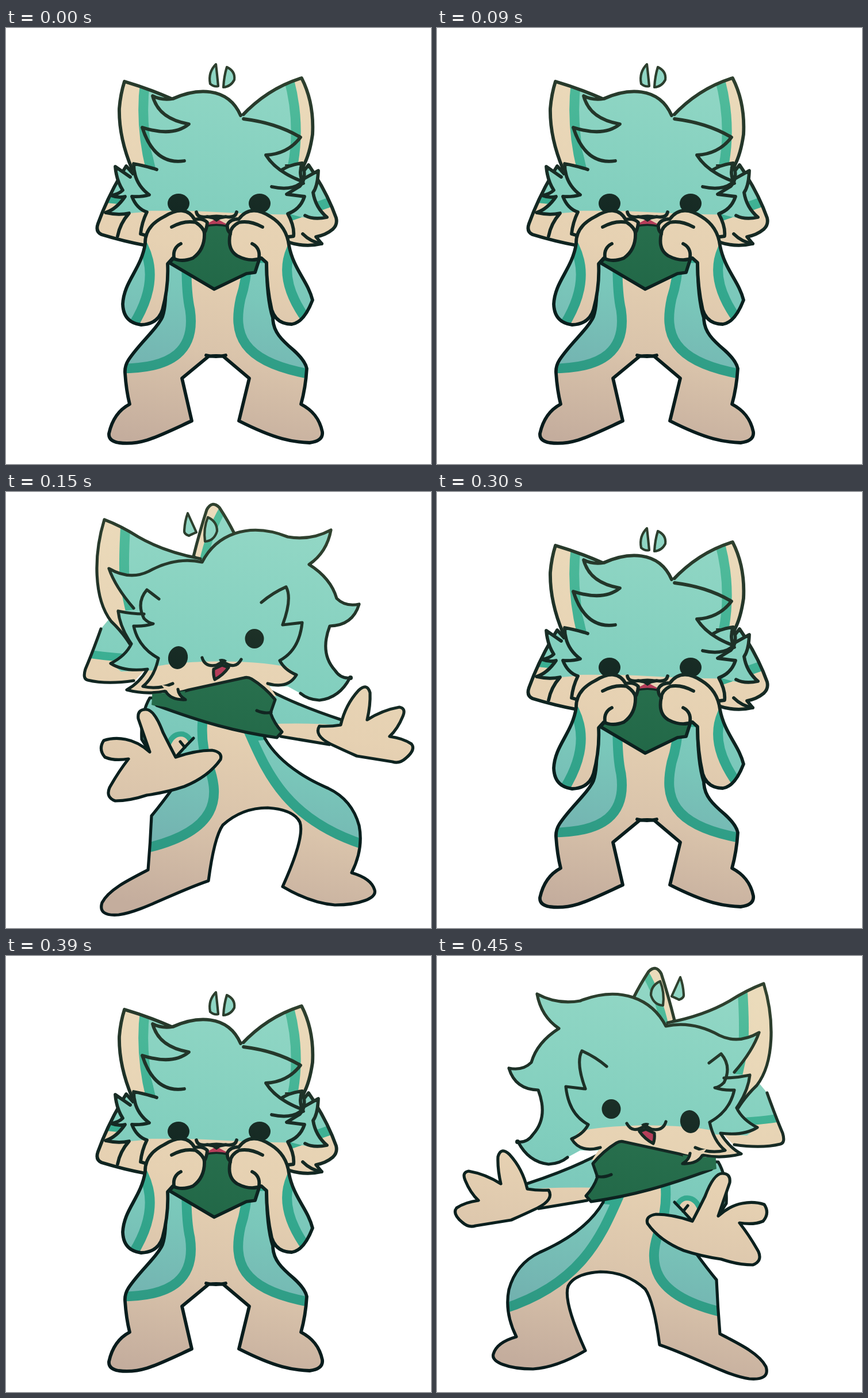
Write an HTML page that moves like this. It is 739x758 px and loops after 0.6 s.

```html
<!DOCTYPE html>
<html lang="en">
<head>
<meta charset="utf-8">
<title>Dancing critter</title>
<style>
html, body { margin: 0; width: 100%; height: 100%; overflow: hidden; background: #fff; }
svg { display: block; width: 100%; height: 100%; }
.pose {
  --skin: url(#skin); --teal: url(#teal); --band: url(#band);
  --green: url(#green); --ink: url(#ink);
}
.flip {
  --skin: url(#skinFlip); --teal: url(#tealFlip); --band: url(#bandFlip);
  --green: url(#greenFlip); --ink: url(#inkFlip); --gaze: translate(4px, 11px);
}
.skin { fill: var(--skin); }
.teal { fill: var(--teal); }
.green { fill: var(--green); }
.dark { fill: var(--ink); }
.pink { fill: #b53d59; }
.patch { fill: var(--teal); stroke: var(--band); stroke-width: 17; }
.cuff { fill: none; stroke: var(--band); stroke-width: 9; }
.line { stroke: var(--ink); stroke-linecap: round; stroke-linejoin: round; }
.open { fill: none; }
.eye { transform: var(--gaze, none); }
.shy .line { stroke-width: 5.8; }
.wave .line { stroke-width: 5.2; }
.shy .fine, .wave .fine { stroke-width: 4.2; }
.pose { visibility: hidden; animation: .6s step-end infinite; }
#showShy { animation-name: shy; }
#showRight { animation-name: right; }
#showLeft { animation-name: left; }
@keyframes shy { 0%, 50% { visibility: visible } 25%, 75%, 100% { visibility: hidden } }
@keyframes right { 0%, 50%, 100% { visibility: hidden } 25% { visibility: visible } }
@keyframes left { 0%, 100% { visibility: hidden } 75% { visibility: visible } }
</style>
</head>
<body>
<svg viewBox="0 0 739 758" preserveAspectRatio="none">
<defs>
  <linearGradient id="skin" gradientUnits="userSpaceOnUse" x1="430" y1="50" x2="310" y2="730">
    <stop offset="0" stop-color="#ebdbbb"/><stop offset=".5" stop-color="#e6d1b2"/>
    <stop offset=".75" stop-color="#dac4ab"/><stop offset="1" stop-color="#c4ad9d"/>
  </linearGradient>
  <linearGradient id="teal" gradientUnits="userSpaceOnUse" x1="430" y1="50" x2="310" y2="730">
    <stop offset="0" stop-color="#92d7c5"/><stop offset=".4" stop-color="#82cfbe"/>
    <stop offset=".6" stop-color="#7ac7ba"/><stop offset=".8" stop-color="#74b6b2"/>
    <stop offset="1" stop-color="#6ca5a6"/>
  </linearGradient>
  <linearGradient id="band" gradientUnits="userSpaceOnUse" x1="430" y1="50" x2="310" y2="730">
    <stop offset="0" stop-color="#54bd9c"/><stop offset=".5" stop-color="#35ab90"/>
    <stop offset="1" stop-color="#2b927e"/>
  </linearGradient>
  <linearGradient id="green" gradientUnits="userSpaceOnUse" x1="430" y1="50" x2="310" y2="730">
    <stop offset=".3" stop-color="#2b7350"/><stop offset=".65" stop-color="#206646"/>
  </linearGradient>
  <linearGradient id="ink" gradientUnits="userSpaceOnUse" x1="430" y1="50" x2="310" y2="730">
    <stop offset="0" stop-color="#30422f"/><stop offset=".35" stop-color="#182c25"/>
    <stop offset=".6" stop-color="#0a201e"/><stop offset="1" stop-color="#081b1c"/>
  </linearGradient>
  <linearGradient id="skinFlip" href="#skin" gradientTransform="matrix(-1 0 0 1 739 0)"/>
  <linearGradient id="tealFlip" href="#teal" gradientTransform="matrix(-1 0 0 1 739 0)"/>
  <linearGradient id="bandFlip" href="#band" gradientTransform="matrix(-1 0 0 1 739 0)"/>
  <linearGradient id="greenFlip" href="#green" gradientTransform="matrix(-1 0 0 1 739 0)"/>
  <linearGradient id="inkFlip" href="#ink" gradientTransform="matrix(-1 0 0 1 739 0)"/>

  <!-- shy pose outlines -->
  <path id="sBody" d="M279 400C277 440 280 480 272 502C262 524 232 548 213 577Q206 588 207 600Q209 630 215 654C196 664 184 682 179 705Q178 718 196 721C235 726 260 712 323 683L306 609L352 571Q366 569 378 571L423 609L405 683C470 716 500 720 528 721Q552 718 550 702C545 678 532 664 513 654Q521 625 523 592Q520 578 500 560C480 543 464 528 464 504C456 480 453 440 453 400Z"/>
  <path id="sLobeL" d="M209 240Q178 290 160 340Q155 354 166 359Q205 371 243 378L262 300Z"/>
  <path id="sLobeR" d="M526 238Q558 285 574 330Q577 342 568 350Q556 360 539 363L549 375Q520 382 490 372L478 300Z"/>
  <path id="sEarL" d="M206 93Q250 106 290 124L300 250L219 245Q196 190 197 140Q199 115 206 93Z"/>
  <path id="sEarR" d="M514 87Q536 130 533 185Q528 220 517 240L430 240L410 153Q455 105 514 87Z"/>
  <path id="sHead" d="M255 118Q270 126 290 123C330 105 385 100 408 152Q470 165 490 180L485 240L515 235Q524 262 514 272L492 290L519 293Q512 315 490 323Q502 345 500 362L484 372L250 372L234 358Q236 338 245 320Q227 314 219 293Q236 294 249 290Q222 270 222 236Q240 239 262 246L250 205Z"/>
  <path id="sArmL" d="M242 375Q241 345 275 328Q312 305 328 333Q342 330 350 338Q349 350 345 356Q346 385 325 400Q305 408 290 400L281 410Q283 450 272 490Q264 515 235 516Q204 512 203 480C205 440 235 420 242 375Z"/>
  <path id="sArmR" d="M492 378Q488 345 460 328Q425 305 405 332Q390 332 385 342Q384 352 390 357Q384 385 402 396Q425 408 444 400L453 408Q453 450 462 490Q470 515 497 515Q518 512 533 473C525 440 500 420 492 378Z"/>
  <clipPath id="csBody"><use href="#sBody"/></clipPath>
  <clipPath id="csLobeL"><use href="#sLobeL"/></clipPath>
  <clipPath id="csLobeR"><use href="#sLobeR"/></clipPath>
  <clipPath id="csEarL"><use href="#sEarL"/></clipPath>
  <clipPath id="csEarR"><use href="#sEarR"/></clipPath>
  <clipPath id="csHead"><use href="#sHead"/></clipPath>
  <clipPath id="csArmL"><use href="#sArmL"/></clipPath>
  <clipPath id="csArmR"><use href="#sArmR"/></clipPath>

  <!-- waving pose outlines -->
  <path id="wBody" d="M250 358Q234 385 236 430L290 515Q268 545 253 563Q251 610 247 657C210 676 178 692 167 714C162 730 172 737 196 735C235 730 290 697 352 676Q362 600 377 579Q410 549 455 549Q500 552 511 574Q520 600 481 686C515 706 545 716 572 718C615 718 645 706 641 692C636 674 615 666 601 662Q622 620 614 580Q602 535 560 515Q480 480 450 428L440 350Z"/>
  <path id="wArm" d="M455 343Q510 372 583 396L583 441Q520 432 465 424Z"/>
  <path id="wEarL" d="M171 48Q200 59 230 78Q275 104 338 116L300 240L215 264Q202 243 183 225C152 185 152 110 171 48Z"/>
  <path id="wEarR" d="M326 112Q337 68 349 31Q358 14 371 27Q386 50 397 72L342 122Z"/>
  <path id="wLobe" d="M165 238Q150 280 138 308Q133 325 142 327Q175 335 222 330L250 300L218 262L180 220Z"/>
  <clipPath id="cwBody"><use href="#wBody"/></clipPath>
  <clipPath id="cwArm"><use href="#wArm"/></clipPath>
  <clipPath id="cwEarL"><use href="#wEarL"/></clipPath>
  <clipPath id="cwEarR"><use href="#wEarR"/></clipPath>
  <clipPath id="cwLobe"><use href="#wLobe"/></clipPath>

  <g id="shy" class="shy">
    <use href="#sBody" class="skin"/>
    <g clip-path="url(#csBody)">
      <path class="patch" d="M314 400Q313 460 320 490C330 560 290 592 200 592L150 592L150 400Z"/>
      <path class="patch" d="M420 400Q418 440 408 470C395 530 405 580 530 602L570 602L570 400Z"/>
    </g>
    <use href="#sBody" class="line open"/>
    <path class="line open" d="M348 569Q365 573 382 569"/>

    <use href="#sLobeL" class="skin"/>
    <g clip-path="url(#csLobeL)"><path class="patch" d="M140 292L240 302L240 220L140 220Z"/></g>
    <use href="#sLobeL" class="line open"/>
    <use href="#sLobeR" class="skin"/>
    <g clip-path="url(#csLobeR)"><path class="patch" d="M500 325L600 290L600 220L500 220Z"/></g>
    <use href="#sLobeR" class="line open"/>

    <use href="#sEarL" class="skin"/>
    <g clip-path="url(#csEarL)"><path class="patch" d="M243 85Q230 170 256 262L340 262L340 85Z"/></g>
    <use href="#sEarL" class="line open"/>
    <use href="#sEarR" class="skin"/>
    <g clip-path="url(#csEarR)"><path class="patch" d="M488 75Q517 170 494 260L390 260L390 75Z"/></g>
    <use href="#sEarR" class="line open"/>

    <path class="teal" d="M216 259L190 241Q192 265 203 282Q196 289 183 291Q195 296 207 293Q192 315 173 321Q195 326 216 322L262 318L250 240Z"/>
    <path class="teal" d="M518 262L543 248Q542 275 534 286Q538 312 558 329Q535 334 515 329L480 320L490 240Z"/>
    <path class="line open" d="M216 259L190 241Q192 265 203 282Q196 289 183 291Q195 296 207 293Q192 315 173 321Q195 326 214 322Q198 340 194 362M518 262L543 248Q542 275 534 286Q538 312 558 329Q535 334 520 326M549 375Q530 372 516 358"/>

    <use href="#sHead" class="teal"/>
    <g clip-path="url(#csHead)"><path class="skin" d="M200 319Q300 316 366 320T540 325V400H200Z"/></g>
    <path class="line open" d="M408 152C385 100 330 105 290 123Q270 126 255 118Q265 158 318 167Q290 190 237 173Q258 239 310 231M413 158Q470 165 512 190Q490 219 452 221Q470 250 516 267Q498 284 462 276"/>
    <path class="line open" d="M262 246Q240 239 222 236Q222 270 249 290Q236 294 219 293Q227 314 245 320Q236 338 234 358L248 362M479 247Q495 237 515 235Q508 253 517 270M515 235Q524 262 511 275L488 289L519 293Q512 315 490 323Q502 345 500 362L484 364"/>
    <ellipse class="dark" cx="300" cy="305" rx="19" ry="17"/>
    <ellipse class="dark" cx="441" cy="305" rx="19" ry="17"/>

    <path class="green line" d="M345 344Q366 338 387 344L440 403L433 425L418 427L362 454L284 408Z"/>
    <path class="pink" d="M345 343L366 331L387 343Q366 338 345 343Z"/>
    <path class="line open" d="M331 320Q333 331 350 328L366 331L382 328Q399 331 401 320"/>
    <path class="dark" d="M350 326Q366 323 382 326L366 337Z"/>

    <use href="#sArmL" class="skin"/>
    <g clip-path="url(#csArmL)"><path class="patch" d="M239 380Q268 440 222 515L170 530L170 380Z"/></g>
    <use href="#sArmL" class="line open"/>
    <path class="line open" d="M288 346Q310 334 330 338Q345 348 345 358M292 399Q290 382 304 375"/>
    <use href="#sArmR" class="skin"/>
    <g clip-path="url(#csArmR)"><path class="patch" d="M496 385Q472 440 526 512L570 520L570 385Z"/></g>
    <use href="#sArmR" class="line open"/>
    <path class="line open" d="M446 346Q424 334 405 338Q390 346 390 358M440 399Q442 382 428 375"/>

    <path class="teal line fine" d="M365 63Q351 77 355 97Q362 103 369 101Q367 80 365 63ZM384 68Q399 75 397 90Q391 102 378 103Q379 84 384 68Z"/>
  </g>

  <g id="wave" class="wave">
    <use href="#wEarR" class="skin"/>
    <g clip-path="url(#cwEarR)"><path class="patch" style="stroke-width:13" d="M378 28Q352 72 341 130L430 130L430 28Z"/></g>
    <use href="#wEarR" class="line open"/>

    <use href="#wArm" class="skin"/>
    <g clip-path="url(#cwArm)"><path class="teal" d="M440 404Q520 400 590 406V330H440Z"/></g>
    <path class="line open" d="M460 346Q510 372 583 396M478 425Q520 432 562 439"/>

    <use href="#wBody" class="skin"/>
    <g clip-path="url(#cwBody)">
      <path class="patch" d="M342 340L342 395Q338 440 352 475C372 530 372 590 240 620L200 620L200 340Z"/>
      <path class="patch" d="M426 425C455 490 490 570 622 613L660 613L660 400Z"/>
    </g>
    <use href="#wBody" class="line open"/>
    <path class="skin" d="M280 445Q288 418 308 421Q318 424 322 434L297 460Z"/>
    <path class="cuff" d="M280 445Q288 418 308 421Q318 424 322 434"/>

    <use href="#wLobe" class="skin"/>
    <g clip-path="url(#cwLobe)"><path class="patch" style="stroke-width:14" d="M130 279Q170 287 240 290V200H130Z"/></g>
    <path class="line open" d="M165 238Q150 280 138 308Q133 325 142 327Q175 335 222 328"/>

    <use href="#wEarL" class="skin"/>
    <g clip-path="url(#cwEarL)"><path class="patch" d="M209 40Q204 110 206 150Q212 200 232 260L360 260L360 40Z"/></g>
    <path class="line open" d="M338 116Q275 104 230 78Q200 59 171 48C152 110 152 185 183 225Q202 243 215 264"/>

    <path class="green" d="M255 350L300 350L300 385L253 370Z"/>
    <path class="skin" d="M245 308Q232 332 210 344Q245 353 282 346L290 310Z"/>
    <path class="teal" d="M341 122Q360 85 398 72Q440 58 490 78Q530 85 565 66Q558 105 527 126Q565 150 575 185Q590 200 614 195Q603 232 563 233Q545 280 572 310Q582 325 598 323Q580 358 545 362Q525 361 512 350L490 338L300 338L265 310L200 312L182 298Q208 285 218 264Q198 235 195 207L222 205Q190 165 179 133Q215 154 248 138Q295 112 341 122Z"/>
    <path class="skin" d="M262 303C310 293 420 290 489 304L505 318Q490 340 455 333L470 355L290 352L238 338Q255 332 262 303Z"/>
    <path class="line open" d="M222 202Q190 165 179 133Q215 154 248 138Q295 112 341 122Q360 85 398 72Q440 58 490 78Q530 85 565 66Q558 105 527 126Q565 150 575 185Q590 200 614 195Q603 232 563 233Q545 280 572 310Q582 325 598 323Q580 358 545 362Q525 361 512 350"/>
    <path class="line open" d="M240 212Q218 212 195 207Q198 235 218 264Q208 285 182 298Q205 313 246 308Q232 332 210 344Q245 353 278 346M266 186L245 170Q226 192 240 220Q248 228 256 229Q240 234 222 233Q230 270 265 289Q258 322 238 338Q265 344 290 333"/>
    <path class="line open" d="M444 192Q464 175 487 165Q498 185 481 231Q498 229 515 227Q510 275 476 293Q484 309 505 318Q490 343 455 333"/>
    <circle class="dark" cx="599" cy="323" r="4"/>
    <ellipse class="dark" cx="299" cy="288" rx="17" ry="20" transform="rotate(12 299 288)"/>
    <ellipse class="dark eye" cx="432" cy="255" rx="16.5" ry="17"/>
    <path class="pink line" d="M361 308Q360 318 363 326Q378 318 387 305L376 301Z"/>
    <path class="line open" d="M341 288Q346 305 366 301L377 295Q399 310 409 291"/>
    <path class="dark" d="M370 291Q378 288 384 293L376 302Z"/>

    <path class="green line" d="M275 352Q300 350 318 344L414 323Q420 321 427 325Q450 339 468 361L460 384Q466 402 480 417L471 427C400 417 340 400 262 371Z"/>
    <path class="green" d="M254 351L312 346L300 378L255 370Z"/>
    <path class="line open" d="M461 383Q450 386 436 380"/>
    <path class="skin" d="M270 335L301 343Q303 355 312 362Q287 362 278 345Z"/>
    <path class="line open" d="M278 347Q287 362 312 361Q300 354 299 343"/>

    <path class="skin line" d="M545 407Q564 408 582 405Q590 370 613 345Q628 331 633 349Q634 370 628 396Q655 379 684 374Q696 376 690 390Q681 412 667 425Q690 428 705 438Q713 448 695 463Q684 473 672 469L610 459Q585 448 564 438Q535 423 545 407Z"/>
    <path class="skin line" d="M243 378Q258 378 273 418Q285 442 295 461Q330 449 358 449Q377 452 373 465Q352 495 310 512Q280 522 245 527Q215 537 190 537Q173 531 180 514Q195 487 213 464Q188 468 172 461Q160 447 170 432Q188 426 208 430Q230 434 250 452L230 394Q228 378 243 378Z"/>
    <path class="line open" d="M296 460Q310 444 326 428M303 434L311 444"/>

    <path class="teal line fine" d="M316 37L331 70Q322 74 318 76Q309 73 310 67Q311 50 316 37ZM351 44Q367 51 367 68Q362 85 346 86Q343 63 351 44Z"/>
  </g>
</defs>
<use id="showShy" class="pose" href="#shy"/>
<use id="showRight" class="pose" href="#wave"/>
<use id="showLeft" class="pose flip" href="#wave" transform="matrix(-1 0 0 1 739 0)"/>
</svg>
</body>
</html>
```
